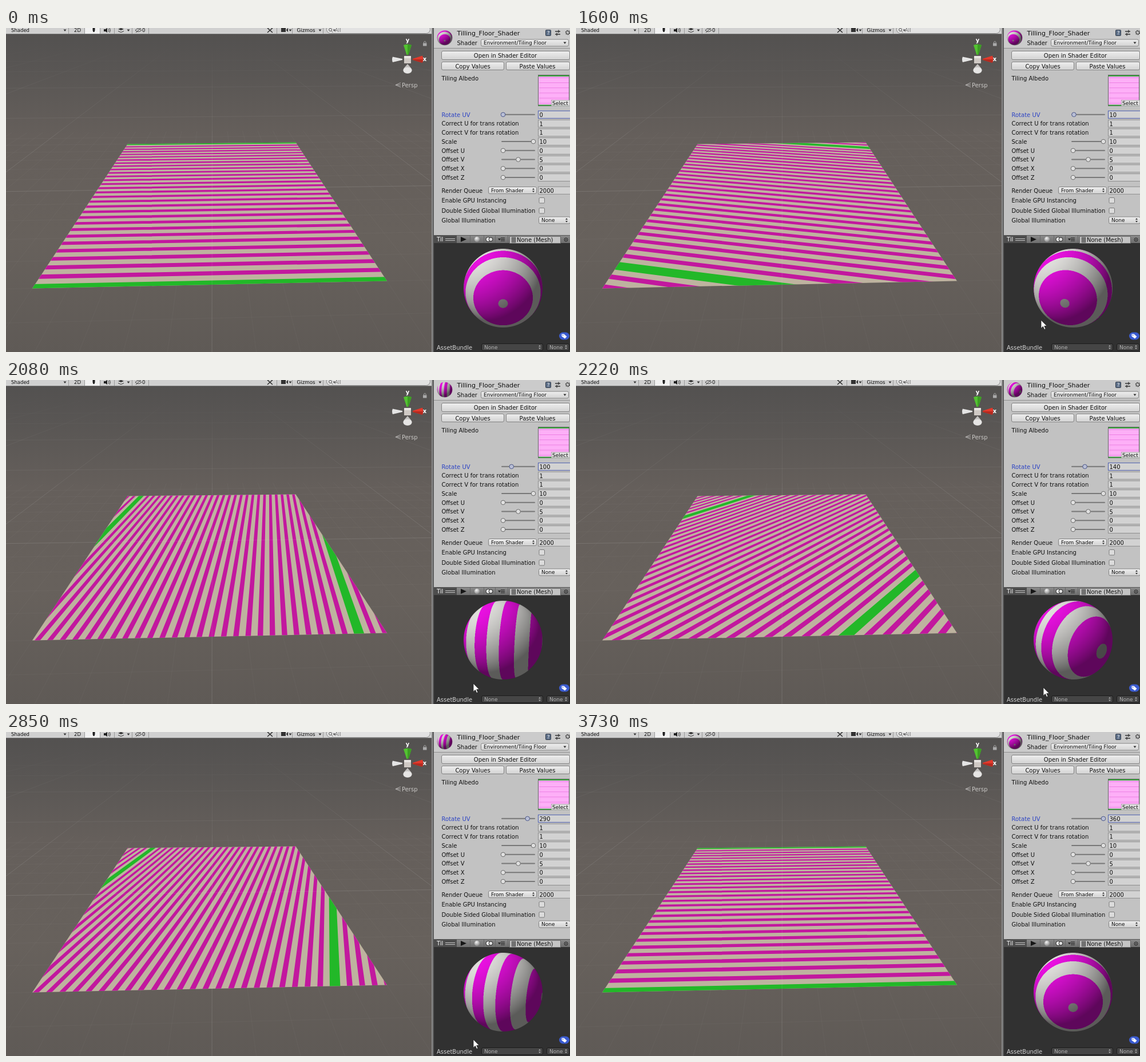
Recreate the animation shown at these times as an HTML page with a canvas. Size 986 px wide and 568 px high, loop 3760 ms.

```html
<!DOCTYPE html>
<html lang="en">
<head>
<meta charset="utf-8">
<title>Tiling floor shader</title>
<style>
html, body { margin: 0; width: 986px; height: 568px; overflow: hidden; background: #c2c2c2; }
svg, canvas { position: absolute; display: block; }
svg { left: 0; top: 0; }
#ball { left: 799px; top: 385.5px; width: 140px; height: 140px; }
#icon { left: 753px; top: 3px; width: 28px; height: 28px; }
text { font-family: "DejaVu Sans", Verdana, sans-serif; white-space: pre; }
</style>
</head>
<body>
<svg id="stage" width="986" height="568" viewBox="0 0 986 568">
  <defs>
    <linearGradient id="sky" x1="0" y1="0" x2="0" y2="1">
      <stop offset="0" stop-color="#535150"/><stop offset=".12" stop-color="#595654"/>
      <stop offset=".32" stop-color="#655f5b"/><stop offset=".65" stop-color="#67615c"/>
      <stop offset="1" stop-color="#5f5a56"/>
    </linearGradient>
    <linearGradient id="fade" gradientUnits="userSpaceOnUse" x1="0" y1="30" x2="0" y2="300">
      <stop offset="0" stop-color="#d8d8d8" stop-opacity="0"/>
      <stop offset=".3" stop-color="#d8d8d8" stop-opacity=".06"/>
      <stop offset="1" stop-color="#d8d8d8" stop-opacity=".12"/>
    </linearGradient>
    <linearGradient id="btn" x1="0" y1="0" x2="0" y2="1">
      <stop offset="0" stop-color="#eeeeee"/><stop offset="1" stop-color="#d2d2d2"/>
    </linearGradient>
    <linearGradient id="bar" x1="0" y1="0" x2="0" y2="1">
      <stop offset="0" stop-color="#8c8c8c"/><stop offset="1" stop-color="#6c6c6c"/>
    </linearGradient>
    <radialGradient id="bead" cx=".4" cy=".3" r=".8">
      <stop offset="0" stop-color="#f4f4f4"/><stop offset="1" stop-color="#777"/>
    </radialGradient>
    <clipPath id="floorClip"><path id="floorEdge"/></clipPath>
    <clipPath id="viewClip"><rect y="11" width="745" height="557"/></clipPath>
  </defs>
  <g clip-path="url(#viewClip)">
    <rect y="10" width="745" height="558" fill="url(#sky)"/>
    <path id="minor" fill="none" stroke="#fff" stroke-opacity=".03"/>
    <path id="major" fill="none" stroke="url(#fade)"/>
    <path id="floor" fill="#beb39f"/>
    <g clip-path="url(#floorClip)">
      <path id="magenta" fill="#c2189e"/>
      <path id="green" fill="#22b828"/>
      <path id="over" fill="none" stroke="#ddd" stroke-opacity=".12"/>
    </g>
  </g>
  <g id="ui"></g>
</svg>
<canvas id="ball" width="280" height="280"></canvas>
<canvas id="icon" width="56" height="56"></canvas>
<svg width="986" height="568" viewBox="0 0 986 568">
  <path id="cursor" d="M0 0V14.5L3.4 11.3L5.8 16.6L8 15.6L5.7 10.5H10.2Z" fill="#fff" stroke="#222" stroke-width=".8"/>
</svg>
<script>
const LOOP = 3760, TAU = Math.PI * 2;
const $ = id => document.getElementById(id);
const ui = $('ui');

/* ---------- interface ---------- */
function add(tag, attrs, body) {
  const el = document.createElementNS('http://www.w3.org/2000/svg', tag);
  for (const k in attrs) el.setAttribute(k, attrs[k]);
  if (body !== undefined) el.textContent = body;
  return ui.appendChild(el);
}
const box = (x, y, w, h, fill, more) => add('rect', { x, y, width: w, height: h, fill, ...more });
const label = (x, y, s, size = 10, fill = '#101010', anchor = 'start') =>
  add('text', { x, y, 'font-size': size, fill, 'text-anchor': anchor }, s);
const shape = (d, fill, stroke = 'none', width = 1) => add('path', { d, fill, stroke, 'stroke-width': width });
const disc = (cx, cy, r, fill, stroke = 'none') => add('circle', { cx, cy, r, fill, stroke });
const tri = (x, y, fill = '#333') => shape(`M${x - 2.5} ${y - 1.5}h5l-2.5 3.5z`, fill);
const button = (x, y, w, h, more) => box(x + .5, y + .5, w - 1, h - 1, 'url(#btn)', { stroke: '#838383', rx: 2.5, ...more });
const field = (y, s, stroke = '#8d8d8d') => {
  box(930.5, y - 6.5, 60, 13, '#d2d2d2', { stroke });
  return label(932.5, y + 4, s);
};
const popup = (x, y, w, h, s) => {
  button(x, y, w, h);
  label(x + 5, y + h / 2 + 3.2, s, 9);
};
const updown = (x, y) => shape(`M${x - 2} ${y - 1}h4l-2 -2.8zM${x - 2} ${y + 1}h4l-2 2.8z`, '#333');

function sceneBar() {
  box(0, 0, 745, 11, '#d0d0d0');
  box(0, 10, 745, 1, '#777');
  shape('M109.5 0V10M137.5 0V10M164.5 0V10M189.5 0V10M220.5 0V10M249.5 0V10M473.5 0V10M500.5 0V10M554.5 0V10', 'none', '#999');
  box(138, 0, 26, 10, '#f1f1f1');
  label(9, 7, 'Shaded', 8.5);
  tri(103, 4);
  label(119, 7, '2D', 8.5);
  shape('M151.5 0h4v4l-1 3h-2l-1 -3z', '#222');
  shape('M171 2h3l3 -2v8l-3 -2h-3z', '#222');
  shape('M179 1q2 3 0 6M181 0q3 4 0 8', 'none', '#444');
  shape('M196 2l5 -2l5 2l-5 2zM196 5l5 2l5 -2v1l-5 2l-5 -2z', '#333');
  tri(214, 4);
  shape('M226 4q5 -6 11 0q-6 5 -11 0M227 8l9 -8', 'none', '#444');
  label(238, 7, '0', 8.5);
  shape('M457 0l9 8M466 0l-9 8', 'none', '#333', 1.6);
  shape('M481 0h8v7h-8zM490 3l3 -3v7l-3 -3z', '#333');
  tri(497, 4);
  label(508.5, 7, 'Gizmos', 8.7);
  tri(549, 4);
  box(560.5, -5, 181, 14.5, '#e2e2e2', { stroke: '#8a8a8a', rx: 7 });
  disc(567, 3, 2.5, 'none', '#555');
  shape('M569 5l2.5 3M572 3h4l-2 2.5z', '#555', '#555', .8);
  label(575, 7, 'All', 8.5, '#777');
}

function axisGizmo() {
  label(702, 25, 'y', 10, '#fff', 'middle').setAttribute('font-weight', 'bold');
  label(732, 58, 'x', 10, '#fff', 'middle').setAttribute('font-weight', 'bold');
  shape('M695 30Q702 27 709 30L703.5 47h-3z', '#53c331');
  shape('M702 29Q706 28.5 709 30L703.5 47h-1.5z', '#3d9d24');
  shape('M728 48.5Q730.5 55 728 61L711 56v-2z', '#e2392c');
  shape('M728 55v6L711 56v-1z', '#b32b20');
  shape('M676 50.5Q674 55 676 60L693 56v-2z', '#e4e4e4');
  box(696, 49, 12, 13, '#cfc9c4');
  box(696, 49, 12, 4, '#e8e5e2');
  shape('M702 63L708 70Q711 74 708 78Q702 82 696 78Q693 74 696 70z', '#c4c2c0');
  add('ellipse', { cx: 702, cy: 74, rx: 7.5, ry: 5.2, fill: '#e6e5e4' });
  label(692, 103.5, 'Persp', 10, '#c9c7c5');
  shape('M690 96l-9 3.8l9 3.8M681 99.8h9', 'none', '#b5b3b1');
  box(729, 26.5, 6.5, 5, '#aaa');
  shape('M730.5 26.5v-1.5q1.8 -3.5 3.6 0v1.5', 'none', '#aaa');
}

function inspector() {
  box(744, 0, 4, 568, '#8a8a8a');
  box(746, 0, 2, 568, '#5c5c5c');
  box(748, 0, 238, 363, '#c2c2c2');
  box(748, 0, 238, 35, '#cbcbcb');
  box(748, 35, 238, 1, '#8f8f8f');
  label(788.5, 13, 'Tilling_Floor_Shader', 11);
  label(788.5, 30, 'Shader');
  popup(830, 19.5, 154, 13, 'Environment/Tiling Floor');
  tri(977, 26);
  box(943.5, 3.5, 9, 10, '#5d6f88', { stroke: '#303a48', rx: 1 });
  label(948, 12, '?', 8, '#fff', 'middle');
  shape('M960 6h9M960 11h9M966 3.5v5M963 8.5v5', 'none', '#333', 1.3);
  add('circle', { cx: 982, cy: 8, r: 3, fill: 'none', stroke: '#444', 'stroke-width': 2.4, 'stroke-dasharray': '2 1' });

  button(761, 40, 225, 16);
  label(873, 52, 'Open in Shader Editor', 10, '#101010', 'middle');
  button(761, 59, 110, 15);
  label(816, 70.5, 'Copy Values', 10, '#101010', 'middle');
  button(874, 59, 112, 15);
  label(929, 70.5, 'Paste Values', 10, '#101010', 'middle');

  label(761.5, 92, 'Tiling Albedo');
  box(930.5, 82.5, 54, 54, '#fcb6f8', { stroke: '#666' });
  for (let i = 0; i < 16; i++) box(932, 86 + i * 3, 52, i % 3 ? 1 : 1.6, i % 3 ? '#ffa2f5' : '#f48bea');
  box(931, 83, 53, 2, '#35a83a');
  box(931, 134.5, 53, 1.8, '#35a83a');
  box(953.5, 126.5, 32, 10, '#dedede', { stroke: '#999', 'stroke-width': .6 });
  label(955, 135, 'Select', 9);

  const rows = [['Rotate UV', 0, 0], ['Correct U for trans rotation', 1], ['Correct V for trans rotation', 1],
    ['Scale', 10, 1], ['Offset U', 0, 0], ['Offset V', 5, .5], ['Offset X', 0, 0], ['Offset Z', 0, 0]];
  const live = {};
  rows.forEach(([name, value, pos], i) => {
    const y = 151.8 + i * 15.75, first = i === 0;
    label(761.5, y + 3.7, name, 10, first ? '#2c43c4' : '#101010');
    const text = field(y, value, first ? '#4a5cae' : undefined);
    if (pos === undefined) return;
    box(866, y - 1, 59, 2, '#787878', { rx: 1 });
    const knob = disc(869 + 53 * pos, y, 3.8, first ? '#b9bfd6' : '#e0e0e0', first ? '#4b5688' : '#6a6a6a');
    if (first) { live.text = text; live.knob = knob; }
  });

  label(761.5, 288.5, 'Render Queue');
  popup(843, 278, 85, 13, 'From Shader');
  updown(922, 284.5);
  field(284.8, '2000');
  label(761.5, 306, 'Enable GPU Instancing');
  label(761.5, 323.5, 'Double Sided Global Illumination');
  for (const y of [297.5, 315.5]) box(932, y, 9.5, 9.5, '#dcdcdc', { stroke: '#7a7a7a', rx: 1.5 });
  label(761.5, 341, 'Global Illumination');
  popup(931, 330.5, 56, 13, 'None');
  updown(980, 337);
  return live;
}

function preview() {
  box(748, 363, 238, 15, 'url(#bar)');
  box(748, 363, 40, 15, '#4d4d4d');
  box(748, 363, 238, 1, '#5a5a5a');
  box(748, 377, 238, 191, '#313131');
  label(753, 374, 'Til', 10, '#fff');
  shape('M768 369.5h17M768 372.5h17', 'none', '#c8c8c8');
  shape('M795 366l10 4.5l-10 4.5z', '#161616');
  shape('M811.5 364v13M835.5 364v13M855.5 364v13M877.5 364v13', 'none', '#686868');
  disc(823.5, 370.5, 4.7, 'url(#bead)');
  disc(843, 370.5, 4, '#f2f2f2', '#222');
  disc(847.5, 370.5, 3.4, '#ddd', '#222');
  shape('M865 368h7M865 370.5h7M865 373h7', 'none', '#222', 1.2);
  tri(862.5, 370.5, '#222');
  box(880.5, 365.5, 89, 12, '#c4c4c4', { stroke: '#666' });
  shape('M884 367h7v9h-7zM886.5 367v9M889 367v9M884 370h7M884 373h7', '#888', '#555', .7);
  label(893, 375, 'None (Mesh)');
  disc(979, 371, 3, 'none', '#222');
  disc(979, 371, 1, '#222');

  box(967, 533.5, 18, 13, '#3a5bd0', { rx: 6.5 });
  shape('M971.5 536.5h4l5 4.5l-3.5 3.5l-5.5 -4z', '#fff');
  disc(973.6, 538.6, .9, '#3a5bd0');
  label(753, 563.5, 'AssetBundle', 10, '#d4d4d4');
  for (const [x, w] of [[831, 108], [945, 40]]) {
    box(x + .5, 553.5, w - 1, 12, '#454545', { stroke: '#1c1c1c', rx: 2.5 });
    label(x + 5, 563, 'None', 9, '#b4b4b4');
    shape(`M${x + w - 8} 558.5h4l-2 -2.8zM${x + w - 8} 560.5h4l-2 2.8z`, '#aaa');
  }
}

sceneBar();
axisGizmo();
const live = inspector();
preview();

/* ---------- floor: unit square to screen ---------- */
const project = (() => {
  const [[x0, y0], [x1, y1], [x2, y2], [x3, y3]] = [[46, 456.5], [666, 443.5], [506.5, 200.5], [212.5, 203.5]];
  const ax = x1 - x2, ay = y1 - y2, bx = x3 - x2, by = y3 - y2;
  const sx = x0 - x1 + x2 - x3, sy = y0 - y1 + y2 - y3, det = ax * by - bx * ay;
  const g = (sx * by - bx * sy) / det, h = (ax * sy - sx * ay) / det;
  return (u, v) => {
    const w = 1 + g * u + h * v;
    return [((x1 - x0 + g * x1) * u + (x3 - x0 + h * x3) * v + x0) / w,
            ((y1 - y0 + g * y1) * u + (y3 - y0 + h * y3) * v + y0) / w];
  };
})();
const poly = pts => 'M' + pts.map(p => project(...p).map(n => n.toFixed(2)).join(' ')).join('L');

const square = poly([[0, 0], [1, 0], [1, 1], [0, 1]]) + 'Z';
$('floor').setAttribute('d', square);
$('floorEdge').setAttribute('d', square);

let minor = '', major = '';
for (let i = -14; i <= 24; i++) {
  minor += poly([[i / 10, -.3], [i / 10, 1.2]]);
  if (i > -3 && i < 12) minor += poly([[-1.5, i / 10], [2.5, i / 10]]);
}
for (let i = -6; i < 7; i++) major += poly([[i + .5, -.3], [i + .5, 14]]);
for (let i = 0; i < 5; i++) major += poly([[-10, i + .5], [11, i + .5]]);
$('minor').setAttribute('d', minor);
$('major').setAttribute('d', major);
$('over').setAttribute('d', poly([[.5, 0], [.5, 1]]) + poly([[0, .5], [1, .5]]));

const COUNT = 28, FIRST = .04, STEP = (1 - 2 * FIRST) / (COUNT - 1), HALF = .0076, EDGE = .0143;

function drawFloor(a) {
  const s = Math.sin(a), c = Math.cos(a);
  // p runs across the stripes, q along them, both from the middle of the square
  const at = (p, q) => [.5 + p * s + q * c, .5 + p * c - q * s];
  const strip = (mid, half) => {
    const lo = mid - half - .5, hi = mid + half - .5;
    return poly([at(lo, -.72), at(hi, -.72), at(hi, .72), at(lo, .72)]) + 'Z';
  };
  let d = '';
  for (let tile = -1; tile < 2; tile++)
    for (let k = 0; k < COUNT; k++) {
      const mid = tile + FIRST + k * STEP;
      if (Math.abs(mid - .5) < .73) d += strip(mid, HALF);
    }
  $('magenta').setAttribute('d', d);
  $('green').setAttribute('d', strip(0, EDGE) + strip(1, EDGE));
}

/* ---------- preview ball, ray cast ---------- */
const ball = $('ball').getContext('2d'), icon = $('icon').getContext('2d');
const SIZE = 280, R = 138, D = 4.8, TILT = 19 * Math.PI / 180;
const image = ball.createImageData(SIZE, SIZE), dots = [];
for (let j = 0; j < SIZE; j++) for (let i = 0; i < SIZE; i++) {
  const x = (i + .5 - SIZE / 2) / R, y = (SIZE / 2 - j - .5) / R, r = Math.hypot(x, y);
  const alpha = Math.min(1, Math.max(0, (1 - r) * R + .5));
  if (!alpha) continue;
  const m = 1 / Math.sqrt(D * D - 1), q = 1 + Math.min(r * r, 1) * m * m;
  const t = (D - Math.sqrt(Math.max(0, D * D - q * (D * D - 1)))) / q;
  const X = x * m * t, Y = y * m * t, Z = D - t;
  const light = .41 + .6 * Math.max(0, -.52 * X + .66 * Y + .54 * Z);
  dots.push([(j * SIZE + i) * 4, X, Z * Math.cos(TILT) - Y * Math.sin(TILT), light, alpha * 255]);
}
// cuts between gray and magenta along the stripe axis, pole to pole
const BANDS = [.995, .755, .475, .185, -.085, -.395, -.69, -.985];

function drawBall(a) {
  const s = Math.sin(a), c = Math.cos(a), px = image.data;
  for (const [o, X, near, light, alpha] of dots) {
    const d = near * c - X * s;
    let k = 0;
    while (k < BANDS.length && d < BANDS[k]) k++;
    const pink = k % 2, dim = k === 0 || k === BANDS.length ? .8 : 1;
    px[o] = (pink ? 230 : 222 * dim) * light;
    px[o + 1] = (pink ? 16 : 221 * dim) * light;
    px[o + 2] = (pink ? 222 : 218 * dim) * light;
    px[o + 3] = alpha;
  }
  ball.putImageData(image, 0, 0);
  icon.clearRect(0, 0, 56, 56);
  icon.imageSmoothingQuality = 'high';
  icon.drawImage(ball.canvas, 1, 1, 54, 54);
}

/* ---------- timeline ---------- */
// the screen refreshes in even ticks, so key repeats show at the next tick
const TICK = 31.7, PHASE = 27.9;
const refresh = t => PHASE + Math.floor((t - PHASE) / TICK) * TICK;

// one key press, a pause, then key repeat
function angleAt(t) {
  if (t < 1260) return 0;
  if (t < 1728.5) return 10;
  return Math.min(360, 20 + 10 * Math.floor((t - 1728.5) / 40.5));
}

const PATH = [[30, 980, 562], [280, 925, 330], [530, 868, 147], [650, 870, 151], [830, 870, 151],
  [1180, 818, 553], [1330, 812, 530], [1590, 813, 512], [1700, 813, 512], [1930, 817, 524],
  [2200, 817, 539], [3570, 817, 539], [3720, 930, 574]];

function moveCursor(t) {
  const k = PATH.findIndex(p => p[0] > t);
  $('cursor').style.display = k > 0 ? '' : 'none';
  if (k < 1) return;
  const [t0, x0, y0] = PATH[k - 1], [t1, x1, y1] = PATH[k];
  const f = (t - t0) / (t1 - t0);
  $('cursor').setAttribute('transform', `translate(${Math.round(x0 + (x1 - x0) * f)} ${Math.round(y0 + (y1 - y0) * f)})`);
}

let shown = -1;
function render(t) {
  moveCursor(t);
  const deg = angleAt(refresh(t));
  if (deg === shown) return;
  shown = deg;
  live.text.textContent = deg;
  live.knob.setAttribute('cx', 869 + 53 * deg / 360);
  drawFloor(deg / 360 * TAU);
  drawBall(deg / 360 * TAU);
}

const start = performance.now();
function tick() {
  render((performance.now() - start) % LOOP);
  requestAnimationFrame(tick);
}
tick();
</script>
</body>
</html>
```
